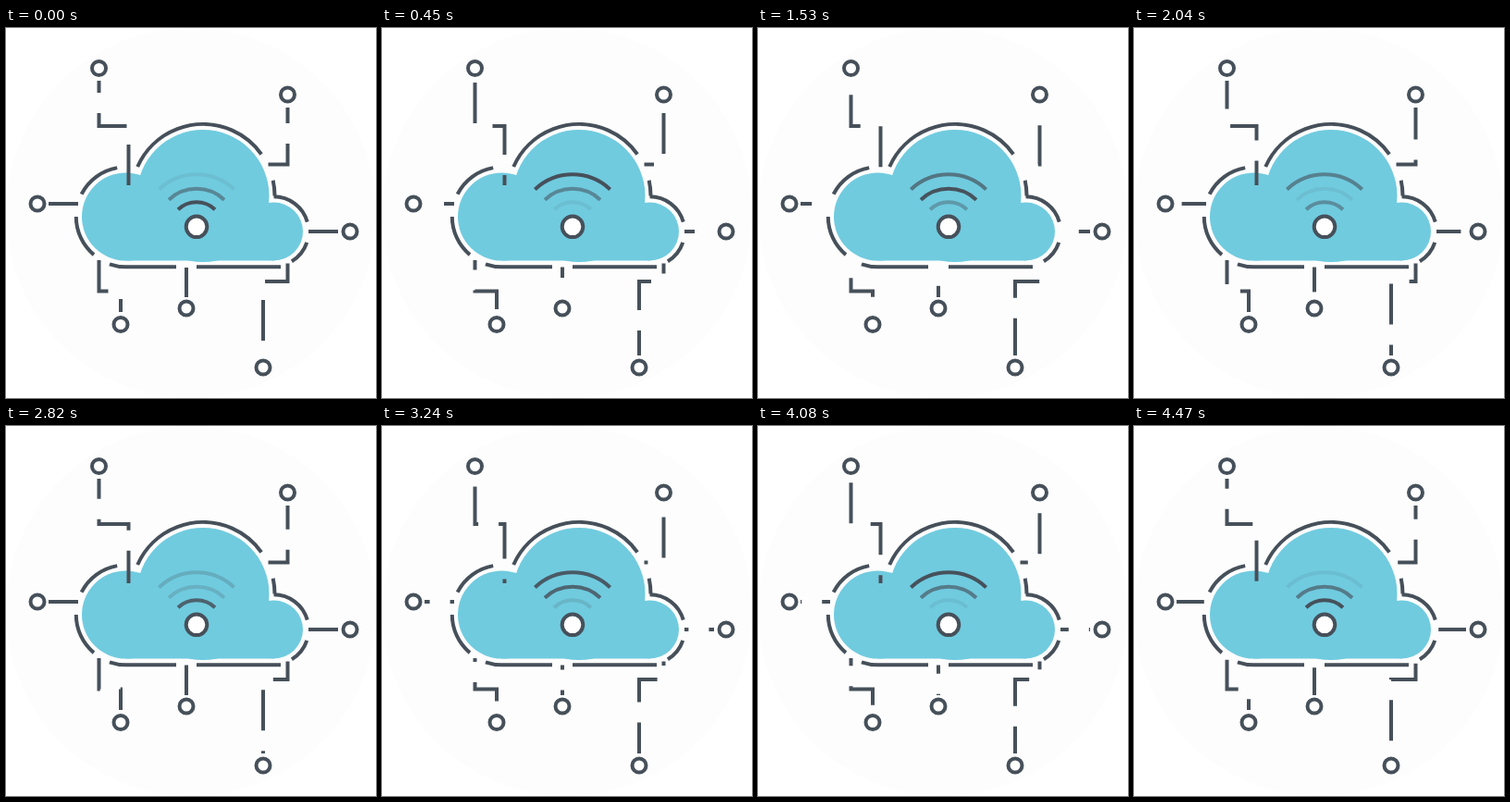
Write an HTML page with a canvas that moves like this. It is 400 px wide and 400 px high and loops after 4.5 s.

```html
<!DOCTYPE html>
<html lang="en">
<head>
<meta charset="utf-8">
<title>Cloud network</title>
<style>
  html, body { margin: 0; width: 100%; height: 100%; overflow: hidden; background: #fff; }
  canvas { display: block; width: 100vw; height: 100vh; }
</style>
</head>
<body>
<canvas id="stage" width="400" height="400"></canvas>
<script>
const ctx = document.getElementById('stage').getContext('2d');

const INK = '#46505a', SKY = '#70cbdf', PAPER = '#fdfdfd';
const CYCLE = 900, STEP = 30;
const DASH = 44, GAP = 22;
const TAU = Math.PI * 2;

// Lobes of the cloud: centre, fill radius, outline radius.
const LEFT = { x: 129.5, y: 204, r: 47.5, outer: 53.7 };
const TOP = { x: 213, y: 181.5, r: 71.5, outer: 77.5 };
const RIGHT = { x: 289.5, y: 220, r: 31.5, outer: 37.7 };

// Each link runs from its node to the cloud; start is the dash position at time zero.
const links = [
  { node: [100.5, 43.5], start: 35, path: [[100.5, 57], [100.5, 106], [132.5, 106], [132.5, 170]] },
  { node: [304.5, 72], start: -27, path: [[304.5, 86], [304.5, 147.5], [283.5, 147.5]] },
  { node: [34, 190], start: -12, path: [[46, 190], [78, 190]] },
  { node: [372, 220], start: -12, path: [[359, 220], [327, 220]] },
  { node: [195, 303], start: -12, path: [[195, 291], [195, 258.5]] },
  { node: [124, 320.5], start: -30, path: [[124, 307], [124, 284.5], [100.5, 284.5], [100.5, 251]] },
  { node: [278, 367], start: 16, path: [[278, 354], [278, 274], [304.5, 274], [304.5, 254.5]] }
];

// Radius and peak moment (as a part of the cycle) of each signal arc.
const waves = [
  { r: 29, peak: 0 },
  { r: 43.5, peak: 0.75 },
  { r: 59, peak: 0.5 }
];

function disc(x, y, r, color) {
  ctx.beginPath();
  ctx.arc(x, y, r, 0, TAU);
  ctx.fillStyle = color;
  ctx.fill();
}

function ring(x, y, r) {
  disc(x, y, r, '#fff');
  ctx.stroke();
}

function polyline(points) {
  ctx.beginPath();
  points.forEach(([x, y]) => ctx.lineTo(x, y));
  ctx.stroke();
}

function arc(x, y, r, fromDeg, toDeg) {
  ctx.beginPath();
  ctx.arc(x, y, r, fromDeg * TAU / 360, toDeg * TAU / 360);
  ctx.stroke();
}

function edge(lobe, fromDeg, toDeg) {
  arc(lobe.x, lobe.y, lobe.outer, fromDeg, toDeg);
}

function drawCloud() {
  for (const lobe of [LEFT, TOP, RIGHT]) disc(lobe.x, lobe.y, lobe.r, SKY);
  ctx.fillRect(LEFT.x, 190, RIGHT.x - LEFT.x, 61.5);

  edge(LEFT, 207, 260);
  edge(LEFT, 130, 180);
  edge(TOP, 204, 324.5);
  edge(TOP, 347.5, 360);
  edge(RIGHT, 270, 344);
  edge(RIGHT, 18.5, 59);

  ctx.beginPath();
  ctx.arc(LEFT.x, LEFT.y, 54.3, 1.9, Math.PI / 2, true);
  ctx.lineTo(184, 258.3);
  ctx.moveTo(206, 258.3);
  ctx.lineTo(297, 258.3);
  ctx.stroke();
}

function drawLinks(phase) {
  ctx.setLineDash([DASH, GAP]);
  for (const { start, path } of links) {
    ctx.lineDashOffset = -(start + phase * (DASH + GAP));
    polyline(path);
  }
  ctx.setLineDash([]);
  for (const { node: [x, y] } of links) ring(x, y, 7.5);
}

function drawSignal(phase) {
  for (const { r, peak } of waves) {
    const glow = (1 + Math.cos((phase - peak) * TAU)) / 2;
    ctx.globalAlpha = 0.1 + 0.9 * glow;
    arc(206, 217.3, r, 226.5, 313.5);
  }
  ctx.globalAlpha = 1;
  ring(206, 214.8, 11.3);
}

function draw(now) {
  const phase = (Math.floor(now / STEP) * STEP % CYCLE) / CYCLE;
  ctx.fillStyle = '#fff';
  ctx.fillRect(0, 0, 400, 400);
  disc(200, 200, 200, PAPER);
  ctx.strokeStyle = INK;
  ctx.lineWidth = 4;
  drawCloud();
  drawLinks(phase);
  drawSignal(phase);
}

const began = performance.now();
function tick() {
  draw(performance.now() - began);
  requestAnimationFrame(tick);
}
tick();
</script>
</body>
</html>
```
